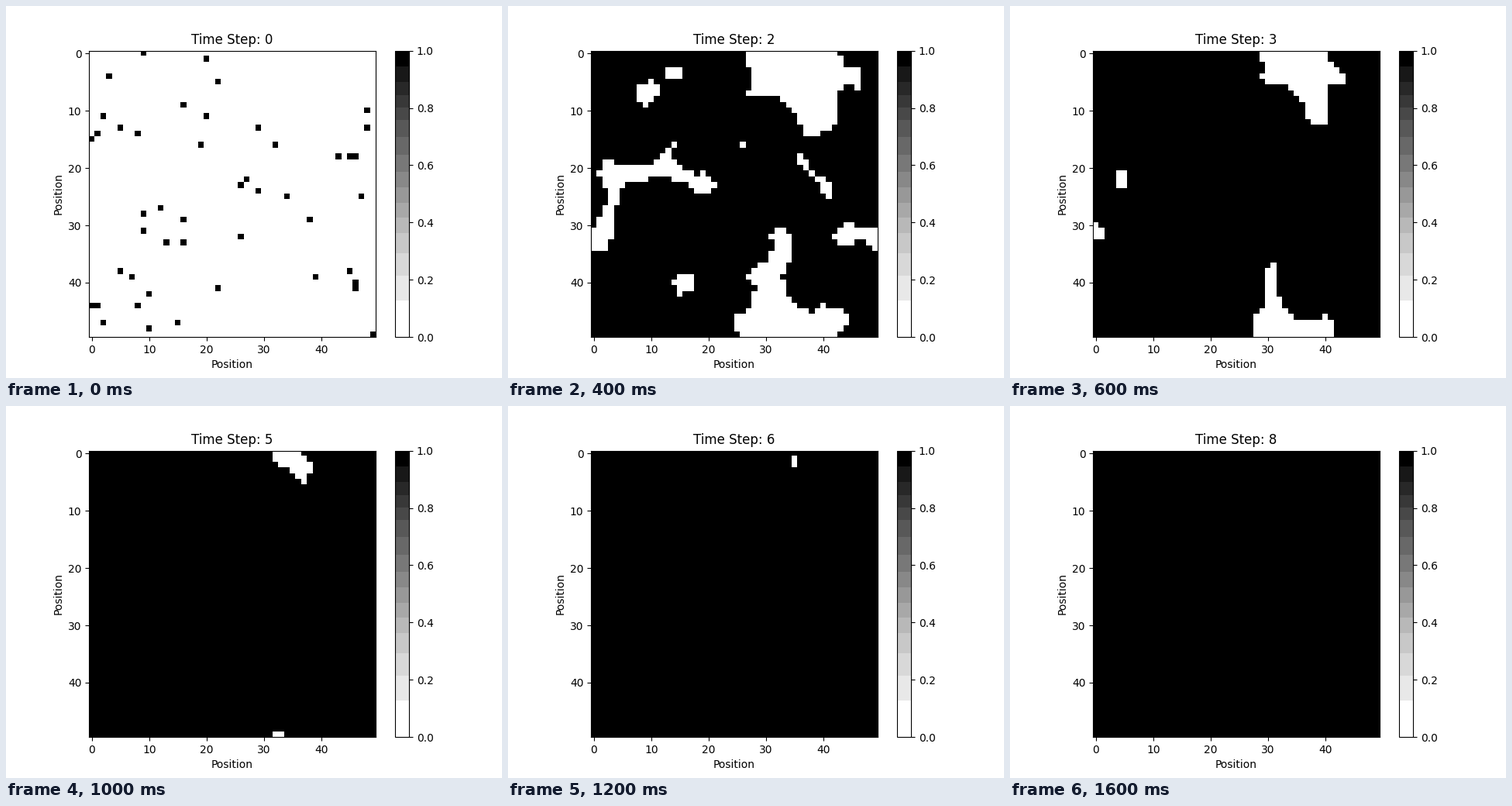
A matplotlib script that plays this animation: 640x480 px, repeating every 1800 ms.

```python
import matplotlib.pyplot as plt
import numpy as np
from matplotlib.animation import FuncAnimation
from matplotlib.colors import ListedColormap

SIZE = 50
STEPS = 9
INNER, OUTER = 4, 6      # activation and inhibition radii
INHIBITION = 0.34

# Starting live cells, counted in reading order
SEEDS = [
    9, 70, 203, 272, 466, 548, 552, 570, 655, 679, 698, 701, 708, 750, 819,
    832, 943, 945, 946, 1127, 1176, 1229, 1284, 1297, 1362, 1409, 1466, 1488,
    1559, 1626, 1663, 1666, 1905, 1945, 1957, 1989, 2046, 2072, 2096, 2110,
    2200, 2201, 2208, 2352, 2365, 2410, 2499,
]


def start():
    grid = np.zeros((SIZE, SIZE), dtype=int)
    grid.flat[SEEDS] = 1
    return grid


def evolve(grid):
    """Near neighbours activate a cell, those in the outer ring inhibit it."""
    near = np.zeros_like(grid)
    ring = np.zeros_like(grid)
    for dy in range(-OUTER, OUTER + 1):
        for dx in range(-OUTER, OUTER + 1):
            dist2 = dx * dx + dy * dy
            if dist2 < INNER ** 2:
                near += np.roll(grid, (dy, dx), axis=(0, 1))
            elif dist2 < OUTER ** 2:
                ring += np.roll(grid, (dy, dx), axis=(0, 1))
    return (near - INHIBITION * ring > 1e-9).astype(int)


def banded_greys():
    """Greys reduced to sixteen flat tones."""
    tone = np.round(plt.get_cmap("Greys")(np.arange(256))[:, 0] * 255)
    band = tone // 16
    flat = band * 16 + 8
    flat[band == 15] = 255
    flat[band == 0] = 0
    return ListedColormap(np.repeat(flat[:, None] / 255, 3, axis=1))


states = [start()]
for _ in range(STEPS - 1):
    states.append(evolve(states[-1]))

fig, ax = plt.subplots(figsize=(6.4, 4.8), dpi=100)
image = ax.imshow(states[0], cmap=banded_greys(), vmin=0, vmax=1,
                  interpolation="nearest")
fig.colorbar(image, ax=ax)
ax.set_xlabel("Position")
ax.set_ylabel("Position")
title = ax.set_title("Time Step: 0")


def update(step):
    image.set_data(states[step])
    title.set_text(f"Time Step: {step}")
    return image, title


anim = FuncAnimation(fig, update, frames=STEPS, interval=200,
                     repeat=True, repeat_delay=0, blit=False)
plt.show()
```
